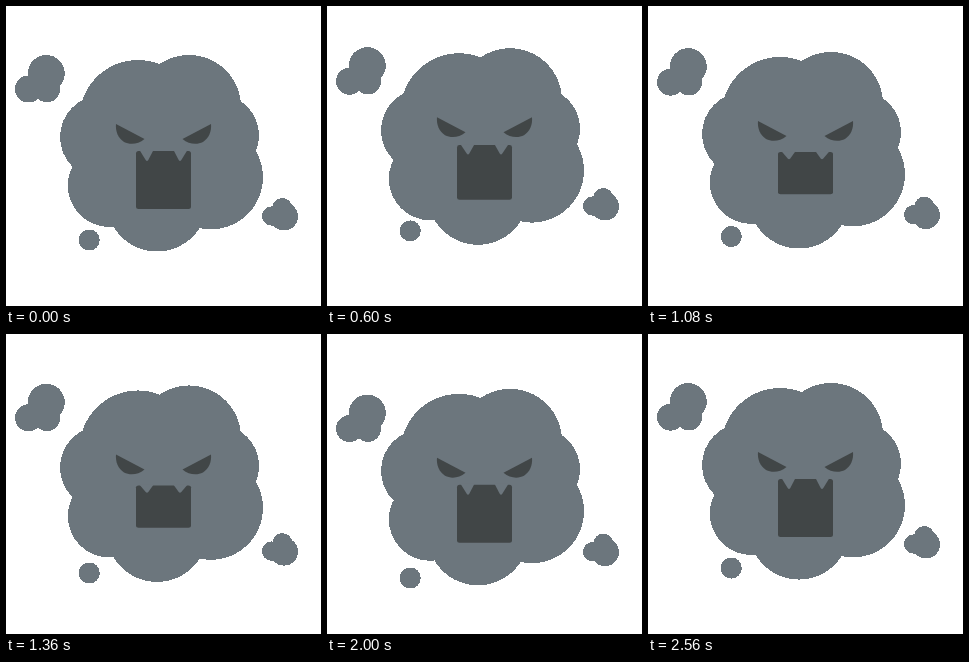
An HTML page for the animation above (2600 ms loop, 315x300 px).

```html
<!DOCTYPE html>
<html lang="en">
<head>
<meta charset="utf-8">
<title>Angry cloud</title>
<style>
  html, body { margin: 0; width: 100%; height: 100%; overflow: hidden; background: #fff; }
  svg { display: block; width: 100vw; height: 100vh; fill: #6c767d; }
  circle { shape-rendering: crispEdges; }
  .dark { fill: #414647; }
</style>
</head>
<body>
<svg viewBox="0 0 315 300">
  <g id="left">
    <circle cx="40.3" cy="67.5" r="18.5"/>
    <circle cx="22.5" cy="83" r="13.5"/>
    <circle cx="41" cy="83.3" r="13"/>
  </g>
  <g id="right">
    <circle cx="278" cy="210.5" r="14"/>
    <circle cx="276.3" cy="202" r="10"/>
    <circle cx="265.7" cy="210" r="9.7"/>
  </g>
  <g id="bubble"><circle cx="83.3" cy="234" r="10.5"/></g>
  <g id="cloud">
    <circle cx="132" cy="112.5" r="58.5"/>
    <circle cx="183" cy="101" r="52"/>
    <circle cx="95.5" cy="131" r="41.5"/>
    <circle cx="103.3" cy="179.5" r="41.5"/>
    <circle cx="151" cy="195" r="50.5"/>
    <circle cx="205" cy="171.3" r="52"/>
    <circle cx="211.8" cy="129.5" r="41.3"/>
    <circle cx="155" cy="148" r="60"/>
    <g class="dark">
      <path id="eye" d="M110 118L138.5 133C132 138.500 124 139 118 136C112 132 109.300 125 110 118Z"/>
      <use href="#eye" transform="translate(315 0) scale(-1 1)"/>
    </g>
    <g id="mouth">
      <rect class="dark" x="130" y="145" width="55" height="58" rx="2.500"/>
      <path id="tooth" d="M133.500 144L139.700 154Q141 156 142.300 154L147.500 144Z"/>
      <use href="#tooth" transform="translate(315 0) scale(-1 1)"/>
    </g>
  </g>
</svg>
<script>
  const LOOP = 2600, STEP = 40, PIVOT = 159.5;
  const el = id => document.getElementById(id);

  // Cosine ease from a to b while t runs from t0 to t1
  function ease(t, t0, t1, a, b) {
    const p = Math.min(1, Math.max(0, (t - t0) / (t1 - t0)));
    return a + (b - a) * (1 - Math.cos(Math.PI * p)) / 2;
  }

  // Rise, sink and return to rest; lag delays both turning points
  function bob(t, lag, up, down) {
    const top = 690 + lag, bottom = 1780 + lag;
    const rest = LOOP + Math.min(0, 2 * lag);
    if (t < top) return ease(t, 0, top, 0, -up);
    if (t < bottom) return ease(t, top, bottom, -up, down);
    return ease(t, bottom, rest, down, 0);
  }

  const bite = t => t < 1230 ? ease(t, 340, 1230, 1, 0.71) : ease(t, 1230, 2000, 0.71, 1);
  const shift = (id, y) => el(id).setAttribute("transform", `translate(0 ${y})`);

  function draw(t) {
    shift("cloud", bob(t, 0, 7, 7));
    shift("bubble", bob(t, 0, 9.5, 12));
    shift("left", bob(t, 140, 9.5, 12));
    shift("right", bob(t, -80, 10, 12));
    const s = bite(t);
    el("mouth").setAttribute("transform", `translate(0 ${PIVOT * (1 - s)}) scale(1 ${s})`);
  }

  const start = performance.now();
  function tick() {
    const t = (performance.now() - start) % LOOP;
    draw(Math.floor(t / STEP) * STEP);
    requestAnimationFrame(tick);
  }
  tick();
</script>
</body>
</html>
```
